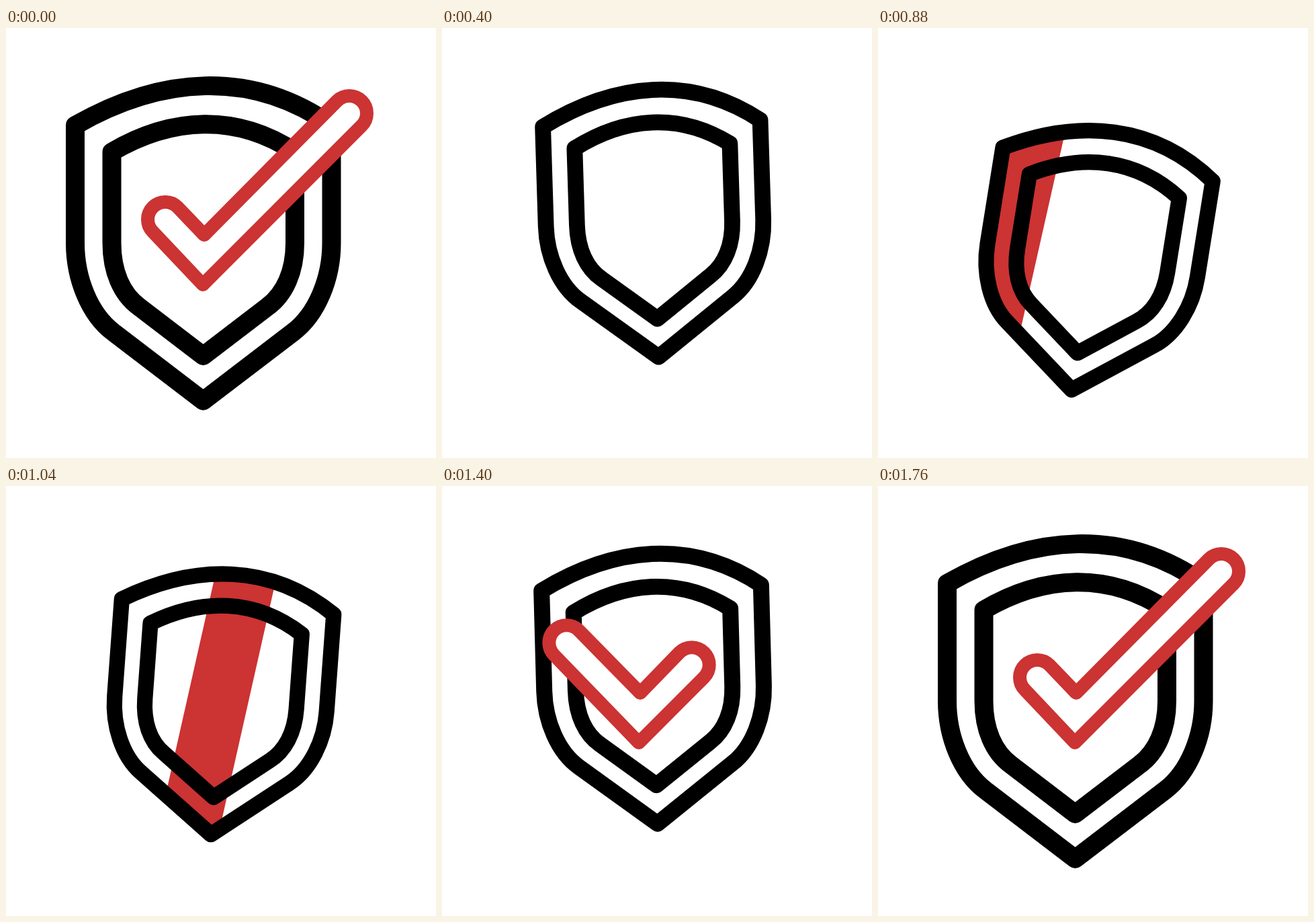
An HTML page with a canvas that plays this animation: 640 px wide and 640 px high, repeating every 2.04 s.

```html
<!DOCTYPE html>
<html>
<head>
<meta charset="utf-8">
<style>
html, body { margin: 0; width: 100%; height: 100%; overflow: hidden; background: #fff }
canvas { display: block; width: 100vmin; height: 100vmin }
</style>
</head>
<body>
<canvas></canvas>
<script>
const LOOP = 2040, STEP = 40, RED = '#cc3333';
const canvas = document.querySelector('canvas'), ctx = canvas.getContext('2d');
const ratio = window.devicePixelRatio || 1;
canvas.width = canvas.height = 640 * ratio;

const outer = new Path2D('M103 145C230 72 365 61 484.5 145V320C484.5 372 463 426 427 453L293.5 555L160 453C124 426 103 372 103 320Z');
const inner = new Path2D('M157.5 184.5C247 132 343 127 430 184.5V320C430 362 415 396 389 415L293.5 488L198 415C172 396 157.5 362 157.5 320Z');

// Shield pose: time, centre x, centre y, degrees, scale
const poses = [
  [0, 293.5, 350, 0, 1],
  [575, 320, 311.5, -2, .829],
  [600, 320, 311.5, -2, .829],
  [880, 315, 370.75, 9.1, .829],
  [1212, 320.4, 322.7, -1.85, .829],
  [1760, 293.5, 350, 0, 1]
];

const clamp = x => Math.min(1, Math.max(0, x));
const mix = (a, b, p) => a + (b - a) * p;
const inOut = x => x < .5 ? 4 * x ** 3 : 1 - 4 * (1 - x) ** 3;

function poseAt(t) {
  const i = poses.findIndex((p, n) => n && t < p[0]);
  if (i < 0) return poses[0];
  const a = poses[i - 1], b = poses[i];
  const p = inOut((t - a[0]) / (b[0] - a[0]));
  return a.map((v, n) => mix(v, b[n], p));
}

function drawShine(t) {
  const right = 241.3 + (t - 880) * .7486, lean = .2256 * 320;
  ctx.beginPath();
  ctx.moveTo(right + lean, 0);
  ctx.lineTo(right - lean, 640);
  ctx.lineTo(right - lean - 92, 640);
  ctx.lineTo(right + lean - 92, 0);
  ctx.fillStyle = RED;
  ctx.fill();
}

function drawShield(t) {
  const [, x, y, deg, scale] = poseAt(t);
  const place = () => {
    ctx.translate(x, y);
    ctx.rotate(deg * Math.PI / 180);
    ctx.scale(scale, scale);
    ctx.translate(-293.5, -350);
  };
  if (t > 720 && t < 1360) {
    ctx.save();
    place();
    ctx.clip(outer);
    ctx.setTransform(ratio, 0, 0, ratio, 0, 0);
    drawShine(t);
    ctx.restore();
  }
  ctx.save();
  place();
  ctx.lineWidth = 28;
  ctx.strokeStyle = '#000';
  ctx.stroke(outer);
  ctx.stroke(inner);
  ctx.restore();
}

// Tick outline; p runs from a short pill on the left (0) to the full tick (1)
function drawTick(p) {
  const q = Math.PI / 4, r = 26, d = r * Math.SQRT1_2;
  const tail = mix(-172, -57, p), head = mix(-93, 217, p);
  const tx = 294 + tail, ty = 342 + tail, hx = 294 + head;
  ctx.beginPath();
  if (head > 20) {
    const hy = 344 - head;
    ctx.moveTo(293, 382);
    ctx.lineTo(hx + d, hy + d);
    ctx.arc(hx, hy, r, q, -3 * q, true);
    ctx.lineTo(295, 308);
  } else {
    ctx.arc(hx, 342 + head, r, 3 * q, -q, true);
  }
  ctx.lineTo(tx + d, ty - d);
  ctx.arc(tx, ty, r, -q, 3 * q, true);
  ctx.closePath();
  ctx.fillStyle = '#fff';
  ctx.fill();
  ctx.lineWidth = 20;
  ctx.strokeStyle = RED;
  ctx.stroke();
}

function draw(now) {
  const t = Math.floor(now % LOOP / STEP) * STEP;
  ctx.setTransform(ratio, 0, 0, ratio, 0, 0);
  ctx.fillStyle = '#fff';
  ctx.fillRect(0, 0, 640, 640);
  ctx.lineJoin = 'round';
  drawShield(t);
  if (t < 400) drawTick(1 - clamp(t / 360) ** 3);
  else if (t >= 1280) drawTick(1 - (1 - clamp((t - 1290) / 470)) ** 3);
}

const start = performance.now();
function frame() {
  draw(performance.now() - start);
  requestAnimationFrame(frame);
}
frame();
</script>
</body>
</html>
```
